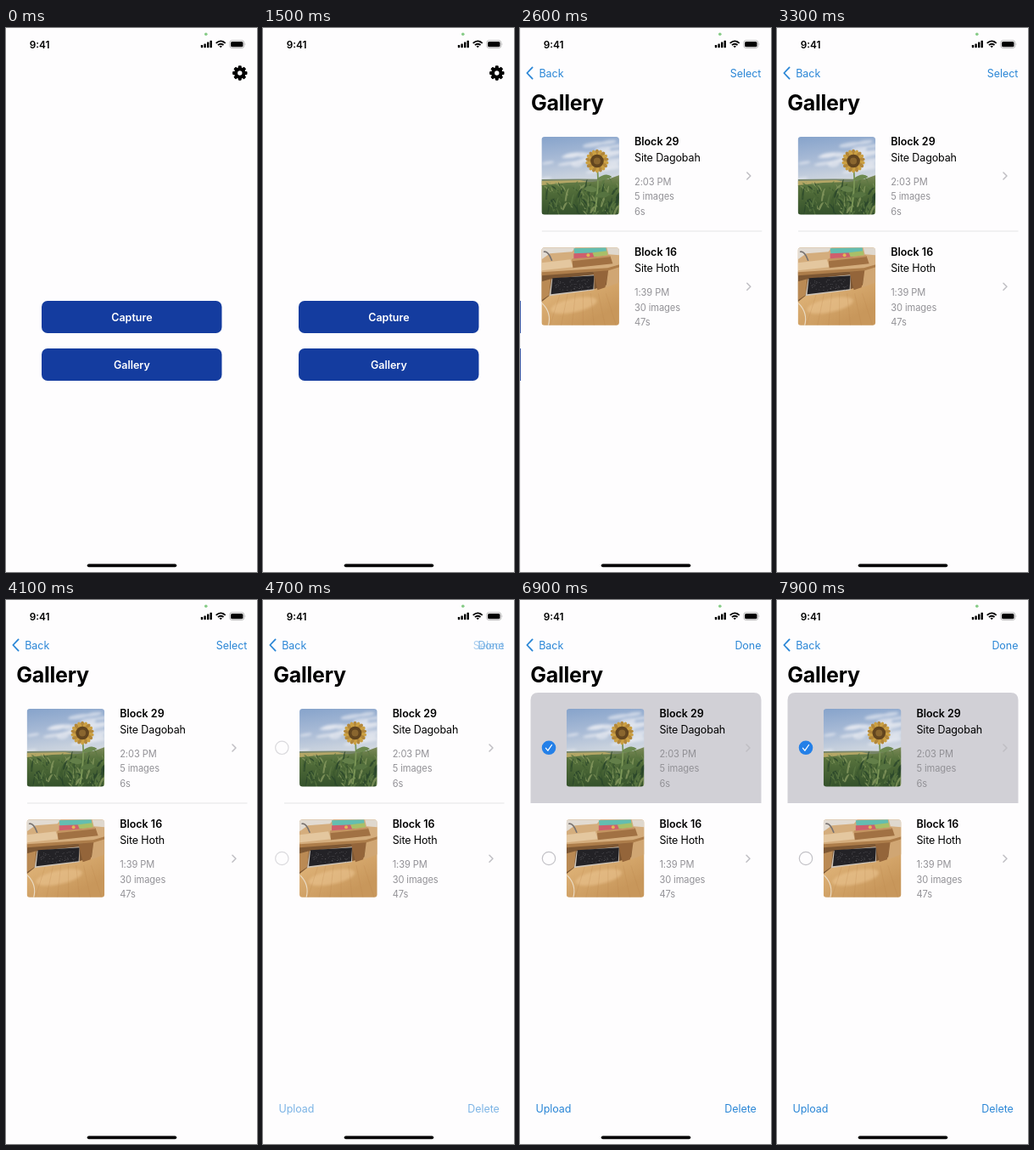
Write an HTML page that moves like this. It is 296 px wide and 640 px high and loops after 8 s.

```html
<!DOCTYPE html>
<html lang="en">
<head>
<meta charset="utf-8">
<title>Gallery</title>
<style>
  html, body { margin: 0; width: 100%; height: 100%; overflow: hidden; background: #fefdfe; }
  svg { display: block; width: 296px; height: 640px; }
  text { font-family: Inter, sans-serif; font-size: 12.5px; letter-spacing: -.13px; }
  .semi { font-weight: 600; letter-spacing: 0; }
  .sub { font-size: 11.1px; fill: #929196; letter-spacing: -.08px; }
  .link { fill: #2a86d6; letter-spacing: -.05px; }
  .big { font-size: 25px; font-weight: 700; letter-spacing: -.25px; }
  .line { fill: none; stroke-linecap: round; stroke-linejoin: round; }
</style>
</head>
<body>
<svg viewBox="0 0 296 640">
  <defs>
    <clipPath id="frame"><rect width="91.5" height="91.5" rx="3.5"/></clipPath>
    <linearGradient id="sky" x2=".2" y2="1">
      <stop offset="0" stop-color="#86a3cb"/><stop offset=".5" stop-color="#a9bbd6"/><stop offset="1" stop-color="#d3d9e0"/>
    </linearGradient>
    <linearGradient id="corn" x2="0" y2="1">
      <stop offset="0" stop-color="#7c8a58"/><stop offset=".3" stop-color="#56713c"/><stop offset="1" stop-color="#34512b"/>
    </linearGradient>
    <linearGradient id="floor" x2=".5" y2="1">
      <stop offset="0" stop-color="#c69660"/><stop offset=".5" stop-color="#deb277"/><stop offset="1" stop-color="#c8975b"/>
    </linearGradient>
    <filter id="soft"><feGaussianBlur stdDeviation="1.6"/></filter>
    <filter id="blur"><feGaussianBlur stdDeviation=".5"/></filter>
  </defs>

  <g id="home">
    <rect width="296" height="640" fill="#fefdfe"/>
    <g fill="#143c9f">
      <rect x="42" y="321" width="212.5" height="38" rx="7"/>
      <rect x="42" y="377" width="212.5" height="38" rx="7"/>
    </g>
    <g fill="#fff" text-anchor="middle">
      <text class="semi" x="148.4" y="344.6">Capture</text>
      <text class="semi" x="148.4" y="400.6">Gallery</text>
    </g>
  </g>
  <rect id="dim" width="296" height="640"/>

  <g id="gallery">
    <rect width="296" height="640" fill="#fefdfe"/>
    <text class="big" x="12.2" y="97">Gallery</text>
    <path id="mark" d="M12.5 239V118q0-9 9-9H275.5q9 0 9 9V239Z" fill="#d1d0d6"/>
    <rect id="rule" x="25" y="238.5" width="259.5" height="1" fill="#e6e5e8"/>
    <g id="rows"></g>
    <g id="tools">
      <text class="link" x="18.4" y="603">Upload</text>
      <text class="link" x="278.8" y="603" text-anchor="end">Delete</text>
    </g>
  </g>

  <g id="gear" transform="translate(275.8 53)">
    <circle r="4.7" fill="none" stroke="#000" stroke-width="4"/>
  </g>
  <path id="arrow" class="line" d="M14.6 46.4L8.3 53L14.6 59.6" stroke="#2a86d6" stroke-width="1.8"/>
  <text id="back" class="link" y="57.7">Back</text>
  <text id="select" class="link" x="284.4" y="57.7" text-anchor="end">Select</text>
  <text id="done" class="link" x="284.4" y="57.7" text-anchor="end">Done</text>

  <g id="status">
    <text class="semi" x="27.7" y="23.6" style="font-size:11.8px">9:41</text>
    <circle cx="235.8" cy="7.3" r="1.8" fill="#86cb87"/>
    <rect x="229.8" y="20" width="2.4" height="3.2" rx=".6"/>
    <rect x="233.4" y="18.4" width="2.4" height="4.8" rx=".6"/>
    <rect x="237" y="16.6" width="2.4" height="6.6" rx=".6"/>
    <rect x="240.5" y="14.8" width="2.4" height="8.4" rx=".6"/>
    <g fill="none" stroke="#000" stroke-width="1.8">
      <path d="M247.7 17.9Q253.2 12.900 258.7 17.9"/>
      <path d="M249.900 20.2Q253.2 17.2 256.5 20.2"/>
    </g>
    <path d="M251.5 21.5Q253.2 20.2 254.9 21.5L253.2 23.3Z"/>
    <rect x="263.8" y="14.7" width="17" height="8.8" rx="2.6" fill="none" stroke="#aaa" stroke-width=".8"/>
    <rect x="265.1" y="16" width="14.4" height="6.2" rx="1.5"/>
    <path d="M281.7 17.6q1.3 1.5 0 3z" fill="#aaa"/>
    <rect x="95.8" y="630.5" width="105.4" height="3.7" rx="1.85"/>
  </g>
</svg>

<script>
const LOOP = 8000, PUSH = 2150, EDIT = 4500, EDIT_LEN = 350, PICK = 6400;
const el = id => document.getElementById(id);
const clamp = v => Math.min(1, Math.max(0, v));
const smooth = v => { v = clamp(v); return v * v * (3 - 2 * v); };
const spring = s => s <= 0 ? 0 : 1 - (1 + 18 * s) * Math.exp(-18 * s);
const fade = (id, v) => el(id).setAttribute('opacity', v);
const shift = (node, x) => node.setAttribute('transform', `translate(${x} 0)`);

let seed = 7;
const rnd = (a, b) => {
  seed = (seed * 16807) % 2147483647;
  return a + (b - a) * seed / 2147483647;
};
const repeat = (n, f) => Array.from({ length: n }, (_, i) => f(i)).join('');
const pick = list => list[Math.floor(rnd(0, list.length))];

function field() {
  const clouds = repeat(24, () =>
    `<ellipse cx="${rnd(0, 90)}" cy="${rnd(10, 46)}" rx="${rnd(6, 15)}" ry="${rnd(1.5, 4)}" fill="#eceff3" opacity=".6" transform="rotate(-9 45 25)"/>`);
  const blades = repeat(110, () => {
    const x = rnd(-3, 92), y = rnd(62, 96), h = rnd(6, 16), lean = rnd(-9, 9);
    return `<path d="M${x} ${y}q${lean / 3} ${-h} ${lean} ${-h}q${-lean / 4} 3 ${2 - lean} ${h}z" fill="${pick(['#86995f', '#3d5a30', '#29452a', '#5a7742'])}" opacity=".8"/>`;
  });
  const petals = repeat(18, i =>
    `<ellipse cy="-9.5" rx="2.2" ry="4.2" fill="${i % 2 ? '#cba043' : '#b3873a'}" transform="rotate(${i * 20})"/>`);
  return `<rect width="92" height="56" fill="url(#sky)"/>
    <g filter="url(#soft)">${clouds}</g>
    <g filter="url(#blur)">
    <path d="M0 50Q40 49 92 50V58H0Z" fill="#78866a"/>
    <path d="M0 52L45 51L60 54L0 58Z" fill="#b5a766"/>
    <path d="M0 57L30 54L60 53L78 50L92 45V92H0Z" fill="url(#corn)"/>${blades}
    <path d="M66 38Q68 58 63 88" class="line" stroke="#7b9657" stroke-width="1.8"/>
    <path d="M66 49Q76 41 83 47Q76 52 66 51Z" fill="#6d8950"/>
    <path d="M65 61Q54 54 50 62Q57 67 65 64Z" fill="#637f49"/>
    <path d="M65 68Q74 61 81 68Q75 73 64 71Z" fill="#567340"/>
    <g transform="translate(65.5 28.5)">${petals}<circle r="7.8" fill="#62451f"/><circle r="4" fill="#8a662f"/></g></g>`;
}

function desk() {
  const grain = repeat(7, i =>
    `<path d="M${10 + i * 13} 92L${22 + i * 9} 54" stroke="#b98149" stroke-width=".5" opacity=".4"/>`);
  const keys = repeat(60, () =>
    `<rect x="${rnd(14, 58)}" y="${rnd(38, 50)}" width="1.2" height=".6" fill="#77767b" opacity=".6"/>`);
  return `<rect width="92" height="92" fill="url(#floor)"/>
    <ellipse cx="38" cy="68" rx="28" ry="8" fill="#ebc591" opacity=".6" transform="rotate(-12 38 68)" filter="url(#soft)"/>${grain}
    <g filter="url(#blur)">
    <path d="M0 28H80L77 44L62 49L10 56L0 64Z" fill="#7d5733"/>
    <path d="M0 40L11 37L9 56L0 62Z" fill="#ba8a54"/>
    <path d="M12 37L62 32L62 50L9 57Z" fill="#cfc5b8"/>
    <path d="M13 36L62 33L61 49L11 55Z" fill="#232226"/>${keys}
    <path d="M61 29L80 25L75 47L66 50Z" fill="#94653a"/>
    <path d="M79 25L92 22V41L76 47Z" fill="#d0a673"/>
    <path d="M0 0H92V21L78 25L0 31Z" fill="#d4ad7d"/>
    <path d="M0 18L34 14L37 23L0 27Z" fill="#e4c79f"/>
    <path d="M0 29L78 24L92 20V23L79 27L0 33Z" fill="#ad7d4a"/>
    <path d="M0 0H40L36 5L10 7L0 14Z" fill="#e2dbd2"/>
    <path d="M3 5Q8 4 12 15" class="line" stroke="#77716f" stroke-width="1.6"/>
    <path d="M36 14L81 10L84 19L37 24Z" fill="#a17143"/>
    <path d="M36 13L80 9L81 11L36 16Z" fill="#c49461"/>
    <path d="M38 1L76 0L77 7L39 8Z" fill="#64bdb0"/>
    <path d="M38 7L64 6L65 11L38 13Z" fill="#ce5f6c"/>
    <path d="M60 6L77 4L78 9L62 11Z" fill="#a9bf68"/>
    <circle cx="55" cy="9" r="2" fill="#e0b955"/>
    <path d="M77 0H92V9L79 8Z" fill="#dfd8ce"/>
    <path d="M1 66Q12 77 8 92" class="line" stroke="#eadcc6" stroke-width="1.1"/></g>`;
}

function row(y, art, title, site, info) {
  const line = (s, dy, cls = '') => `<text class="${cls}" x="134.2" y="${y + dy}">${s}</text>`;
  return `<circle class="ring" cx="34" cy="${y + 45.8}" r="7.7" fill="none" stroke="#c3c2c7" stroke-width="1.2"/>
    <g class="body"><g transform="translate(24.6 ${y})"><g clip-path="url(#frame)">${art}</g></g>
    ${line(title, 9.8, 'semi')}${line(site, 29.1)}
    ${info.map((s, i) => line(s, 56.8 + i * 17.5, 'sub')).join('')}</g>
    <path class="line" d="M267 ${y + 42}l4 4l-4 4" stroke="#bfbec3" stroke-width="1.5"/>`;
}

el('rows').innerHTML =
  row(128, field(), 'Block 29', 'Site Dagobah', ['2:03 PM', '5 images', '6s']) +
  row(258.2, desk(), 'Block 16', 'Site Hoth', ['1:39 PM', '30 images', '47s']) +
  `<g id="check"><circle cx="34" cy="173.8" r="8.3" fill="#2480e8"/>
   <path class="line" d="M30.5 174.3l2.4 2.9l4.6-6.7" stroke="#fff" stroke-width="1.3"/></g>`;
el('gear').innerHTML += repeat(8, i =>
  `<rect x="-2" y="-8.7" width="4" height="4.5" rx="1.1" transform="rotate(${i * 45})"/>`);

const bodies = document.querySelectorAll('.body');
const rings = document.querySelectorAll('.ring');

function draw(t) {
  const p = spring((t - PUSH) / 1000);
  const nav = smooth((t - PUSH) / 350);
  const edit = smooth((t - EDIT) / EDIT_LEN);
  const picked = t >= PICK;

  shift(el('home'), -89 * p);
  fade('dim', .06 * p);
  shift(el('gallery'), 296 * (1 - p));
  fade('gallery', p > 0 ? 1 : 0);

  fade('gear', 1 - nav);
  fade('arrow', nav);
  fade('back', nav);
  el('back').setAttribute('x', 22.2 + 100 * (1 - p));
  fade('select', nav * (1 - edit));
  fade('done', edit);
  fade('tools', edit);

  bodies.forEach(b => shift(b, 30.2 * edit));
  rings.forEach((r, i) => {
    shift(r, -30 * (1 - edit));
    r.setAttribute('opacity', picked && i === 0 ? 0 : edit);
  });
  fade('mark', picked ? 1 : 0);
  fade('check', picked ? 1 : 0);
  fade('rule', picked ? 0 : 1);
}

const start = performance.now();
function tick() {
  draw((performance.now() - start) % LOOP);
  requestAnimationFrame(tick);
}
tick();
</script>
</body>
</html>
```
